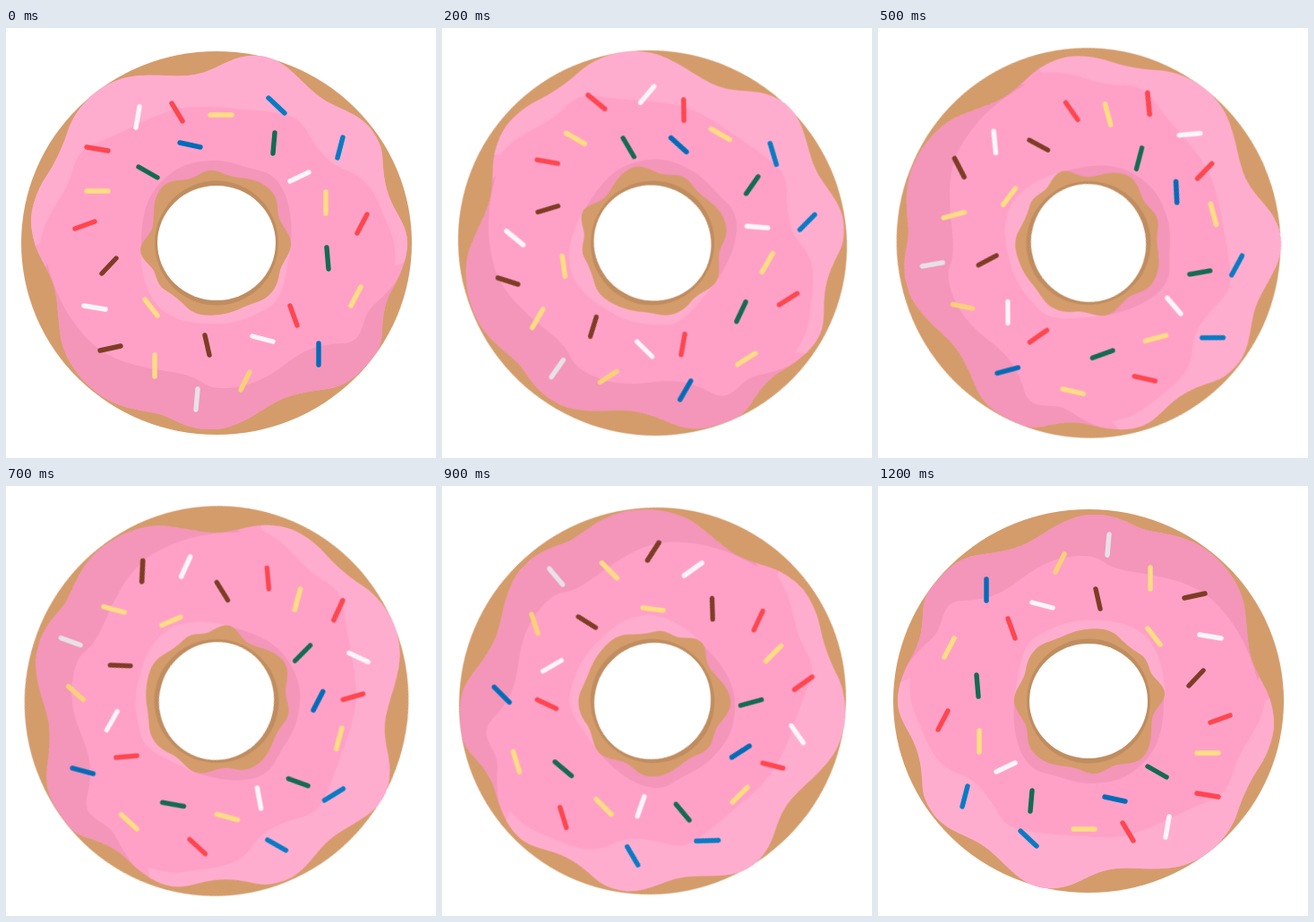
Recreate the animation shown at these times as an HTML page without scripts. Size 480x480 px, loop 1300 ms.

```html
<!DOCTYPE html>
<html lang="en">
<head>
<meta charset="utf-8">
<title>Spinning donut</title>
<style>
  html, body { margin: 0; height: 100%; overflow: hidden; background: #fff; }
  svg { display: block; width: 100vw; height: 100vh; }
  .donut { transform-origin: 235px 240px; animation: spin 1.3s steps(13) infinite; }
  /* 13 poses, 15 degrees apart: the last one shown is the half turn */
  @keyframes spin { to { transform: rotate(195deg); } }
  .dough { fill: #d49c6b; }
  .rim { fill: #c08d60; }
  .icing { fill: #ffa1c7; }
  .light { fill: #ffadce; }
  .shade { fill: #f495ba; }
  .sprinkles { fill: none; stroke-width: 5.4; stroke-linecap: round; }
</style>
</head>
<body>
<svg viewBox="0 0 480 480">
  <defs>
    <path id="icing" d="M125 58C150 49 180 55 203 53S238 41 254 35S290 28 308 40S340 72 358 82
      S397 97 409 115S420 140 421 155S425 183 431 196S448 222 448 240S440 276 433 288
      S421 312 420 335S415 361 404 374S380 400 358 403S318 409 304 416S278 433 262 440
      S240 448 226 448S195 442 182 435S148 428 130 422S100 407 89 396S64 365 61 345
      S58 305 54 290S41 262 36 251S28 226 28 214S34 182 44 167S62 136 69 115S95 69 125 58Z"/>
    <clipPath id="inIcing"><use href="#icing"/></clipPath>
  </defs>

  <g class="donut">
    <ellipse class="dough" cx="235" cy="240" rx="218" ry="214"/>
    <use class="icing" href="#icing"/>

    <g clip-path="url(#inIcing)">
      <path class="shade" d="M46 262C56 300 70 325 92 348S145 378 185 384S215 402 242 402
        S290 392 312 375S350 353 376 352S395 325 408 312S440 285 446 258L480 480H0Z"/>
      <path class="light" d="M20 250L38 240C44 205 66 190 74 160S95 132 125 118S160 100 185 92
        S245 89 280 92S325 98 334 112S355 150 378 158S410 180 420 205S436 235 434 266L470 250V0H0Z"/>
    </g>

    <path class="light" d="M150 244C150 275 158 302 175 315S210 330 235 330S275 322 293 312
      S312 275 318 243Z"/>
    <path class="shade" d="M151 248C151 215 154 190 175 170S212 149 230 148S265 155 286 160
      S322 195 318 243Z"/>

    <path class="dough" d="M229 159C240 159 246 166 260 167S288 172 297 183S301 205 306 215
      S319 232 318 243S307 262 305 275S296 301 280 306S255 318 238 320S210 320 201 311
      S185 297 177 292S168 277 165 271S150 258 150 248S162 232 164 220S163 195 171 182
      S190 171 202 169S218 159 229 159Z"/>
    <ellipse class="rim" cx="235" cy="240" rx="69" ry="69.5"/>
    <ellipse fill="#fff" cx="235" cy="240" rx="66" ry="64"/>

    <g class="sprinkles">
      <path stroke="#fbf5f9" d="M149 88l-4 23M317 171l21-10M87 310l24 4M275 344l23 6"/>
      <path stroke="#e6e2e6" d="M214 403l-2 23"/>
      <path stroke="#ff464f" d="M185 84l12 20M90 133l24 4M77 224l22-8M317 310l8 22M403 208l-11 21"/>
      <path stroke="#ffdd82" d="M228 97h24M90 182h24M155 303l14 18M357 183v24M396 289l-11 21M166 365v24"/>
      <path stroke="#f8d178" d="M272 384l-10 20"/>
      <path stroke="#006cb9" d="M194 128l23 5M349 352v24"/>
      <path stroke="#087bc5" d="M293 78l18 17M376 122l-6 23"/>
      <path stroke="#126b52" d="M300 117l-2 23M148 155l21 12M358 245l2 24"/>
      <path stroke="#7d3d25" d="M107 274l16-17M105 360l23-5M222 343l5 22"/>
    </g>
  </g>
</svg>
</body>
</html>
```
